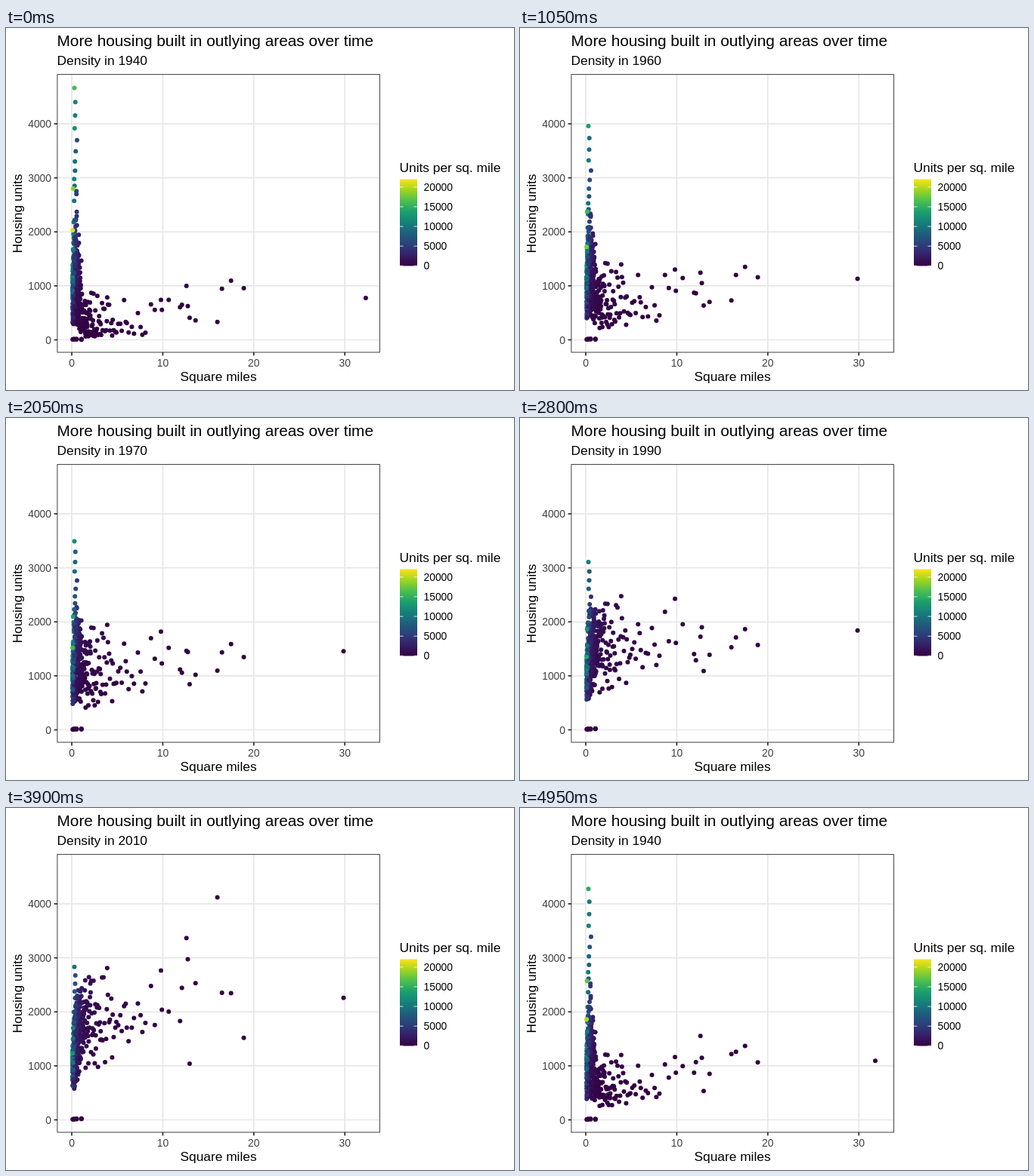
These frames come from a looping animation (672x480 px, 5 s). An HTML page with a canvas:

```html
<!DOCTYPE html>
<html lang="en">
<head>
<meta charset="utf-8">
<title>Housing density by decade</title>
<style>
html, body { margin: 0; width: 100%; height: 100%; overflow: hidden; background: #fff; }
canvas { display: block; }
</style>
</head>
<body>
<canvas id="chart" width="672" height="480"></canvas>
<script>
const ctx = document.getElementById('chart').getContext('2d');
const TICK = 50, LOOP = 5000;
const ARRIVAL = [0, 11, 23, 34, 45, 56, 67, 78, 89, 100]; // in ticks, one per decade
const DECADES = ARRIVAL.length - 1;
const VIRIDIS = ['#440154', '#472d7b', '#3b528b', '#2c728e', '#21918c', '#28ae80', '#5ec962', '#addc30', '#fde725'];
const MAX_DENSITY = 22000;

const lerp = (a, b, t) => a + (b - a) * t;
const clamp = (v, lo, hi) => Math.min(hi, Math.max(lo, v));
const px = miles => 87 + 12.04 * miles;
const py = units => 413.5 - 0.0716 * units;

let seed = 4271;
const random = () => (seed = seed * 16807 % 2147483647) / 2147483647;
const triangular = () => (random() + random()) / 2;

// A tract has one area, and a number of units for each decade
const tract = (area, unitsAt, area40 = area) =>
  ({ area, area40, units: Array.from({ length: DECADES }, (_, s) => unitsAt(s)) });

// Core tracts hold steady while larger ones fill up over time
function typicalTract(i) {
  const q = i * 0.618034 % 1;
  const area = 0.1 + 1.3 * q ** 1.6 + 5 * q ** 12 + 3 * q ** 60;
  const outer = clamp(area - 0.4, 0, 1);
  const first = triangular(), last = triangular();
  const occupied = i % 36 || area > 1.2 ? 1 : 0.01;
  return tract(area, s => {
    const growth = Math.sin(Math.PI * s / 16);
    const low = lerp(lerp(250, 400, growth), lerp(60, 450, growth), outer);
    const high = lerp(2700 * Math.min(1, 0.5 + 2 * area), lerp(1200, 3300, growth), outer);
    const skew = lerp(1.4 - 0.1 * growth, 2.4 * 0.4 ** growth, outer);
    const rank = lerp(first, last, s / 16);
    return occupied * Math.min(lerp(low, high, rank ** skew), 11500 * area);
  });
}

const towerTract = (area, peak) => tract(area, s => peak * (0.5 + 0.5 * Math.exp(-0.22 * s)));

// Units in 1940, 1990 and 2010, straight between them and slower after
const outlyingTract = ([area, y40, y90, y10, area40]) => tract(area, s =>
  s < 5 ? lerp(y40, y90, s / 5) : lerp(y90, y10, Math.min((s - 5) / 2, 1.25)), area40);

const OUTLYING = [
  [29.86, 775, 1840, 2260, 32.3],
  [18.9, 955, 1570, 1520],
  [17.5, 1095, 1865, 2345],
  [16.5, 945, 1710, 2355],
  [16, 330, 1530, 4120],
  [13.6, 360, 1390, 2530],
  [12.95, 410, 1090, 1040],
  [12.75, 625, 1900, 2975],
  [12.6, 1000, 1725, 3365],
  [12.1, 650, 1290, 2445],
  [11.9, 605, 1405, 1830],
  [10.65, 740, 1955, 2005],
  [9.9, 555, 1610, 2040],
  [9.8, 740, 2425, 2765]
];

const tracts = [
  ...Array.from({ length: 440 }, (_, i) => typicalTract(i)),
  ...Array.from({ length: 12 }, (_, i) =>
    towerTract(0.25 + 0.35 * random(), 2700 + 1965 * (1 - i / 11) ** 1.5)),
  towerTract(0.15, 2800),
  towerTract(0.095, 2030),
  ...OUTLYING.map(outlyingTract)
];

// Palette colours are darkened slightly by the display gamma
const channels = hex => [1, 3, 5].map(i => 255 * (parseInt(hex.slice(i, i + 2), 16) / 255) ** 1.22);
const STOPS = VIRIDIS.map(channels);
function densityColor(density) {
  const pos = clamp(density / MAX_DENSITY, 0, 0.9999) * (STOPS.length - 1);
  const i = Math.floor(pos);
  return `rgb(${STOPS[i].map((c, k) => Math.round(lerp(c, STOPS[i + 1][k], pos - i)))})`;
}

function text(str, x, y, size = 17.33, align = 'left', color = '#000') {
  ctx.font = `${size}px "Liberation Sans", Arial, sans-serif`;
  ctx.textAlign = align;
  ctx.fillStyle = color;
  ctx.fillText(str, x, y);
}

function line(x1, y1, x2, y2, color, width) {
  ctx.strokeStyle = color;
  ctx.lineWidth = width;
  ctx.beginPath();
  ctx.moveTo(x1, y1);
  ctx.lineTo(x2, y2);
  ctx.stroke();
}

function drawAxes() {
  for (let v = 0; v <= 4000; v += 1000) {
    line(68, py(v), 494.5, py(v), '#e7e7e7', 1.68);
    line(63.6, py(v), 68, py(v), '#2b2b2b', 1.68);
    text(v, 60, py(v) + 5, 13.87, 'right', '#414141');
  }
  for (let v = 0; v <= 30; v += 10) {
    line(px(v), 61.5, px(v), 430, '#e7e7e7', 1.68);
    line(px(v), 430, px(v), 434.4, '#2b2b2b', 1.68);
    text(v, px(v), 449, 13.87, 'center', '#414141');
  }
  text('More housing built in outlying areas over time', 67.5, 24, 20.8);
  text('Square miles', 281, 468, 17.33, 'center');
  ctx.save();
  ctx.translate(21, 246);
  ctx.rotate(-Math.PI / 2);
  text('Housing units', 0, 0, 17.33, 'center');
  ctx.restore();
}

function drawLegend() {
  text('Units per sq. mile', 520.5, 191);
  const fill = ctx.createLinearGradient(0, 315.5, 0, 200.5);
  VIRIDIS.forEach((_, i) => {
    const share = i / (VIRIDIS.length - 1);
    fill.addColorStop(share, densityColor(share * MAX_DENSITY));
  });
  ctx.fillStyle = fill;
  ctx.fillRect(521, 200.5, 23, 115);
  for (let v = 0; v <= 20000; v += 5000) {
    const y = 315.3 - v * 0.00522;
    line(521, y, 525.6, y, '#fff', 0.8);
    line(539.4, y, 544, y, '#fff', 0.8);
    text(v, 552.5, y + 5, 13.87);
  }
}

function drawTract({ area, area40, units }, from, to, p) {
  const miles = lerp(from ? area : area40, to ? area : area40, p);
  const count = lerp(units[from], units[to], p);
  ctx.fillStyle = densityColor(count / miles);
  ctx.beginPath();
  ctx.arc(px(miles), py(count), 3, 0, 2 * Math.PI);
  ctx.fill();
}

function draw(ms) {
  const tick = Math.floor(ms % LOOP / TICK);
  const from = ARRIVAL.findIndex((a, i) => tick >= a && tick < ARRIVAL[i + 1]);
  const to = (from + 1) % DECADES;
  const steps = from < 2 ? 6 : 5;
  const p = Math.max(0, 1 - (ARRIVAL[from + 1] - tick) / steps);

  ctx.fillStyle = '#fff';
  ctx.fillRect(0, 0, 672, 480);
  drawAxes();
  drawLegend();
  text(`Density in ${1940 + 10 * (p < 0.5 ? from : to)}`, 67.5, 49);
  for (const t of tracts) drawTract(t, from, to, p);
  ctx.strokeStyle = '#2b2b2b';
  ctx.lineWidth = 0.9;
  ctx.strokeRect(67.9, 61.6, 426.5, 368.4);
}

const start = performance.now();
function loop() {
  draw(performance.now() - start);
  requestAnimationFrame(loop);
}
loop();
</script>
</body>
</html>
```
